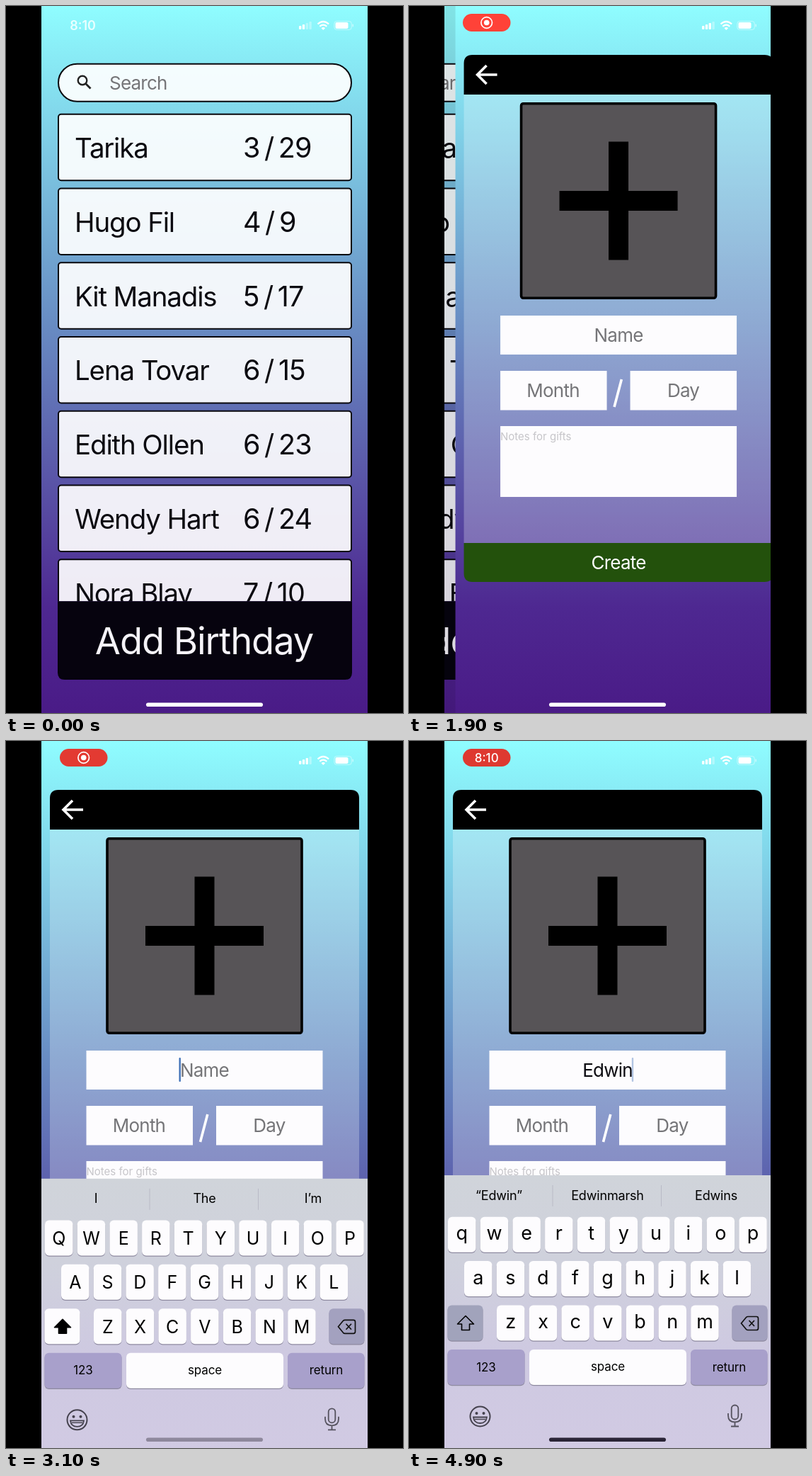
An HTML page for the animation above (5000 ms loop, 561 px wide and 998 px high).

```html
<!DOCTYPE html>
<html lang="en">
<head>
<meta charset="utf-8">
<title>Birthday list</title>
<style>
  html, body { margin: 0; width: 100%; height: 100%; overflow: hidden; background: #000; }
  svg { display: block; width: 100vw; height: 100vh; }
  text { font-family: Inter, "Liberation Sans", sans-serif; font-optical-sizing: none; }
  .big { font-size: 38.5px; letter-spacing: -.03em; fill: #0b0a10; }
  .date { font-size: 39.5px; letter-spacing: -.02em; word-spacing: -.1em; fill: #0b0a10; }
  .field { font-size: 26px; letter-spacing: -.03em; fill: #757578; }
  .mid { text-anchor: middle; }
  .key { font-size: 25px; }
  .small { font-size: 17px; letter-spacing: -.01em; }
  .hint { font-size: 18px; letter-spacing: -.01em; }
</style>
</head>
<body>
<svg id="stage" viewBox="0 0 561 998"></svg>
<script>
const LOOP = 5000, PUSH = 1615, FOCUS = 2700, RISE = 2751, HOLD = 110;
const WIDTH = 461, BOARD = 385;
const people = [
  ['Tarika', '3 / 29'], ['Hugo Fil', '4 / 9'], ['Kit Manadis', '5 / 17'], ['Lena Tovar', '6 / 15'],
  ['Edith Ollen', '6 / 23'], ['Wendy Hart', '6 / 24'], ['Nora Blay', '7 / 10']
];
const typed = 'Edwin';
const presses = [3450, 3700, 3900, 4100, 4280];
const hints = [
  ['I', 'The', 'I’m'], ['“E”', 'Even', 'Every'], ['“Ed”', 'Edit', 'Edge'],
  ['“Edw”', 'Edwin', 'Edwins'], ['“Edwi”', 'Edwin', 'Edwins'], ['“Edwin”', 'Edwinmarsh', 'Edwins']
];

const rect = (x, y, w, h, fill, rx = 0, more = '') =>
  `<rect x="${x}" y="${y}" width="${w}" height="${h}" rx="${rx}" fill="${fill}" ${more}/>`;
const text = (x, y, str, cls, more = '') => `<text x="${x}" y="${y}" class="${cls}" ${more}>${str}</text>`;
const path = (d, more) => `<path d="${d}" ${more}/>`;
const line = (d, color, w) => path(d, `fill="none" stroke="${color}" stroke-width="${w}"`);
const backdrop = rect(50, 0, WIDTH, 998, 'url(#sky)');

// List screen
const border = 'stroke="#08070c" stroke-width="2"';
const pane = 'rgba(255,255,255,.91)';
const list = backdrop + rect(74, 81.7, 414, 53, pane, 26.5, border) +
  '<circle cx="108" cy="105" r="6.3" fill="none" stroke="#222" stroke-width="2.4"/>' +
  line('M112.5 109.5l7 7', '#222', 2.8) + text(146, 117.5, 'Search', 'field') +
  people.map(([name, date], i) => {
    const y = 152.7 + i * 104.75;
    return rect(74, y, 414, 93.5, pane, 4, border) +
      text(97, y + 61.3, name, 'big') + text(335, y + 61.3, date, 'date');
  }).join('') +
  rect(73, 840.3, 416, 158, 'url(#sky)') +
  path('M73 840.3h416v100.7q0 10-10 10h-396q-10 0-10-10z', 'fill="#06030e"') +
  text(280, 915, 'Add Birthday', 'mid',
    'font-size="52.5" letter-spacing="-1.1" fill="#f5f3f8"') +
  rect(50, 0, WIDTH, 998, '#000', 0, 'id="shade"');

// Form screen
const paper = '#fdfcfe';
const form = backdrop +
  rect(62, 125, 437, 633, 'rgba(255,255,255,.25)') +
  path('M62 125v-44q0-12 12-12h413q12 0 12 12v44z', 'fill="#000"') +
  line('M109 97H81M94 84L81 97L94 110', '#fff', 3.6) +
  rect(143, 137.7, 275, 274.6, '#575457', 3, 'stroke="#000" stroke-width="3.6"') +
  rect(197, 261, 167, 28, '#000') + rect(266.5, 191.5, 28, 167, '#000') +
  rect(113.5, 437, 334, 55, paper) + rect(113.5, 515, 150.5, 55.5, paper) +
  rect(297, 515, 150.5, 55.5, paper) + rect(113.5, 593, 334, 100, paper) +
  text(280.5, 474, 'Name', 'field mid', 'id="name"') +
  rect(243.7, 447, 2.4, 34, '#4272b8', 1, 'id="caret"') +
  text(188, 552, 'Month', 'field mid') + text(372, 552, 'Day', 'field mid') +
  line('M274.5 566L284.8 527', '#fff', 3.6) +
  text(113.5, 613, 'Notes for gifts', '', 'font-size="15" fill="#c6c5c9"') +
  path('M62 758h437v43q0 12-12 12h-413q-12 0-12-12z', 'fill="#23510c"') +
  text(280.5, 795, 'Create', 'field mid', 'style="fill:#fff"');

// Keyboard
const keys = [];
[['QWERTYUIOP', 55, 671.7], ['ASDFGHJKL', 78, 734], ['ZXCVBNM', 124, 796.5]].forEach(([row, x0, y]) =>
  [...row].forEach((cap, i) => keys.push({ cap, x: x0 + i * 45.7, y })));
const button = (x, y, w, fill, id = '') =>
  rect(x, y + 1.3, w, 50, '#8e8aa0', 6) + rect(x, y, w, 50, fill, 6, id);
const mauve = '#a8a0cb', ink = '#45424e';
const dot = (x, y, r, more) => `<circle cx="${x}" cy="${y}" r="${r}" ${more}/>`;
const board = rect(50, 613, WIDTH, BOARD, 'url(#board)') +
  line('M203 627v30M356.5 627v30', '#b9bac6', 1) +
  [127, 280.5, 434].map(x => text(x, 647.5, '', 'hint mid', 'data-hint')).join('') +
  keys.map(k => button(k.x, k.y, 39.5, paper) + text(k.x + 19.8, k.y, k.cap, 'key mid', 'data-key')).join('') +
  button(54.5, 796.5, 50, paper, 'id="shift"') +
  path('M80 811.5l11.5 11.5h-6v8.5h-11v-8.5h-6z',
    'id="arrow" stroke="#000" stroke-width="1.6" stroke-linejoin="round"') +
  button(456.5, 796.5, 50, '#a3a1bf') +
  line('M469.5 822l7-8.5q1-1 2.5-1h12q2.5 0 2.5 2.5v14q0 2.5-2.5 2.5h-12q-1.5 0-2.5-1z', '#111', 1.7) +
  line('M480.5 818l7.5 8m0-8l-7.5 8', '#111', 1.7) +
  button(54.5, 859, 109, mauve) + text(109, 889.5, '123', 'small mid') +
  button(170, 859, 222, paper) + text(281, 889, 'space', 'small mid') +
  button(398, 859, 108.5, mauve) + text(452.5, 889.5, 'return', 'small mid') +
  dot(100.5, 953.5, 14, `fill="none" stroke="${ink}" stroke-width="2"`) +
  dot(95.5, 949, 2, `fill="${ink}"`) + dot(105.5, 949, 2, `fill="${ink}"`) +
  line('M91 954.5h19q-1 8.5-9.5 8.5t-9.5-8.5z', ink, 1.8) + line('M93 957.5h15', ink, 1.4) +
  rect(455.7, 937.5, 9.6, 20, 'none', 4.8, 'stroke="#55525e" stroke-width="1.8"') +
  line('M451 949v3q0 9.5 9.5 9.5t9.5-9.5v-3M460.5 961.5v6M455 967.5h11', '#55525e', 1.8) +
  '<g id="popup">' +
  path('M-15-59q0-11 11-11h47q11 0 11 11v38c0 14-14 12-14 28v38q0 6-6 6h-28q-6 0-6-6v-38c0-16-15-14-15-28z',
    `fill="${paper}" style="filter:drop-shadow(0 1px 3px #0007)"`) +
  text(20, -24, '', 'mid', 'id="big" font-size="41"') + '</g>';

// Status bar and home indicator
const status = text(108.5, 34, '8:10', 'mid', 'id="clock" font-size="18" font-weight="600" fill="#e9ffff"') +
  '<g id="pill">' + rect(76, 11, 67.5, 25, '#e0392f', 12.5, 'id="red"') +
  '<g id="rec">' + dot(109.7, 23.5, 7.8, 'fill="none" stroke="#fff" stroke-width="1.7"') +
  dot(109.7, 23.5, 3.8, 'fill="#fff"') + '</g>' +
  text(109.7, 29.5, '8:10', 'mid', 'id="time" font-size="17" font-weight="500" fill="#fff"') + '</g>' +
  [5, 7, 9, 11].map((h, i) => rect(414 + i * 4.8, 33 - h, 3.4, h, '#fff', 1, 'data-bar')).join('') +
  line('M440.5 25.5q7.8-7 15.6 0M443.3 28.8q5-4.3 10 0', '#fff', 2.3) +
  path('M448.3 34l-2.8-2.8q2.8-2.2 5.6 0z', 'fill="#fff"') +
  rect(463.8, 21.5, 24.5, 12, 'none', 3.5, 'stroke="#fff" stroke-opacity=".45"') +
  rect(465.5, 23, 18, 9, '#fff', 2) + rect(489.5, 25.5, 1.5, 4, '#fff', .7, 'opacity=".5"') +
  rect(198, 983.5, 165, 5.6, '#fff', 2.8, 'id="home"');

const stop = (at, color) => `<stop offset="${at}" stop-color="${color}"/>`;
const fade = (id, top, stops) => `<linearGradient id="${id}" gradientUnits="userSpaceOnUse" x1="0" x2="0" ` +
  `y1="${top}" y2="998">${stops}</linearGradient>`;
stage.innerHTML = '<defs>' +
  fade('sky', 0, stop(0, '#8ffdff') + stop(.45, '#688cc3') + stop(.85, '#4e2891') + stop(1, '#4a1b87')) +
  fade('board', 613, stop(0, '#d0d4da') + stop(.3, '#cfd1dc') + stop(.65, '#cec9e1') + stop(1, '#d1cae3')) +
  `<clipPath id="phone">${rect(50, 0, WIDTH, 998, '#000')}</clipPath></defs>` +
  rect(0, 0, 561, 998, '#000') +
  `<g clip-path="url(#phone)"><g id="list">${list}</g><g id="form">${form}</g>` +
  `<g id="board-view">${board}</g>${status}</g>`;

const $ = id => document.getElementById(id);
const all = attr => [...stage.querySelectorAll(`[${attr}]`)];
const labels = all('data-key'), hintTexts = all('data-hint'), bars = all('data-bar');
const set = (id, attrs) => Object.entries(attrs).forEach(([k, v]) => $(id).setAttribute(k, v));
const show = (id, on) => set(id, { display: on ? 'inline' : 'none' });
const clamp = v => Math.max(0, Math.min(1, v));
const mix = (a, b, p) => `rgb(${a.map((v, i) => Math.round(v + (b[i] - v) * p))})`;

// Critically damped spring from 0 to 1
function spring(ms) {
  const s = Math.max(0, ms) * .0183;
  const p = 1 - Math.exp(-s) * (1 + s);
  return p > .997 ? 1 : p;
}

function draw(t) {
  const push = spring(t - PUSH), rise = spring(t - RISE);
  set('list', { transform: `translate(${-.3 * WIDTH * push})` });
  set('form', { transform: `translate(${WIDTH * (1 - push)})` });
  set('shade', { opacity: .1 * push });
  set('board-view', { transform: `translate(0 ${BOARD * (1 - rise)})` });

  const count = presses.filter(p => t >= p + HOLD).length;
  $('name').textContent = count ? typed.slice(0, count) : 'Name';
  $('name').style.fill = count ? '#0b0a10' : '';
  const half = $('name').getComputedTextLength() / 2;
  const since = (t - (count ? presses[count - 1] + HOLD : FOCUS)) % 1000;
  const blink = clamp((550 - since) / 100) + clamp((since - 650) / 100);
  show('caret', t >= FOCUS);
  set('caret', { x: 280.5 + (count ? half - 1 : -half - 1.5), opacity: blink });

  const lower = count > 0;
  keys.forEach((k, i) => {
    labels[i].textContent = lower ? k.cap.toLowerCase() : k.cap;
    labels[i].setAttribute('y', k.y + (lower ? 32.5 : 34.5));
    labels[i].style.fontSize = lower ? '27px' : '';
  });
  hintTexts.forEach((h, i) => h.textContent = hints[count][i]);
  set('shift', { fill: lower ? '#a1a3bb' : paper });
  set('arrow', { fill: lower ? 'none' : '#000' });

  const down = presses.findIndex(p => t >= p && t < p + HOLD);
  show('popup', down >= 0);
  if (down >= 0) {
    const key = keys.find(k => k.cap === typed[down].toUpperCase());
    set('popup', { transform: `translate(${key.x} ${key.y})` });
    $('big').textContent = typed[down];
  }

  show('clock', t < 400);
  show('pill', t >= 400);
  show('rec', t < 3200);
  show('time', t >= 3200);
  const pulse = .5 - .5 * Math.cos((t - 800) / 2050 * 2 * Math.PI);
  set('red', { fill: mix([222, 57, 49], [255, 66, 56], pulse) });
  const signal = t < 1300 ? 2 : 3;
  bars.forEach((b, i) => b.setAttribute('opacity', i < signal ? .95 : .35));
  set('home', {
    fill: t < 3500 ? mix([255, 255, 255], [142, 136, 156], clamp((t - RISE) / 120))
      : mix([142, 136, 156], [42, 36, 54], clamp((t - 3500) / 500))
  });
}

const start = performance.now();
function tick() {
  const t = (performance.now() - start) % LOOP;
  draw(Math.floor(t / 100) * 100);
  requestAnimationFrame(tick);
}
tick();
</script>
</body>
</html>
```
